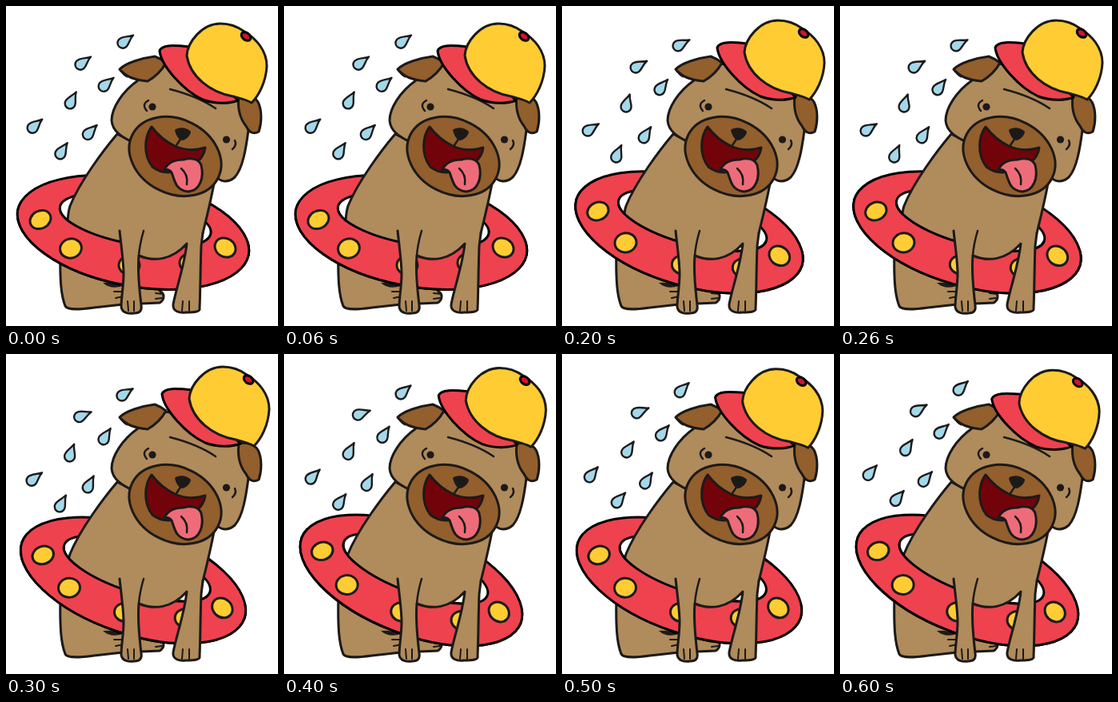
An HTML page that plays this animation: 340 px wide and 400 px high, repeating every 0.7 s.

```html
<!DOCTYPE html>
<html lang="en">
<meta charset="utf-8">
<title>Pug with a swim ring</title>
<style>
html, body { margin: 0; width: 100%; height: 100%; overflow: hidden; background: #fff }
svg { display: block; width: 340px; height: 400px; stroke: #1c1a19; stroke-width: 3; stroke-linecap: round; stroke-linejoin: round }
.fur { fill: #b08b5b }
.dark { fill: #925f2d }
.red { fill: #ee424f }
.sun { fill: #fc3 }
.ink { fill: #1c1a19; stroke: none }
.line { fill: none; stroke-width: 2.5 }
.thin { fill: none; stroke-width: 2 }
#ring, #brim, #button { stroke: #000 }
</style>
<svg viewBox="0 0 340 400">
  <defs>
    <g id="ring">
      <path class="red" fill-rule="evenodd" d="M14.700 255a147 67.500 11 0 1 288.600 56a147 67.500 11 0 1-288.600-56zM67.500 251a95.500 30 10 0 1 188.500 33.500a95.500 30 10 0 1-188.500-33.500z"/>
      <g class="sun" stroke="#1c1a19">
        <ellipse rx="13.5" ry="11" transform="translate(43 267) rotate(-28)"/>
        <ellipse rx="13.5" ry="12" transform="translate(81 303) rotate(-15)"/>
        <ellipse cx="154" cy="324" rx="13" ry="11.5"/>
        <ellipse cx="230" cy="321" rx="13" ry="11.5"/>
        <ellipse rx="13.5" ry="11.5" transform="translate(274 302) rotate(32)"/>
      </g>
    </g>
    <clipPath id="front"><path d="M-20 236L360 303V420H-20z"/></clipPath>
    <path id="drop" fill="#a3d8ea" stroke-width="2.4" d="M3-13C0-7-6.500-3-6.500 3A6.500 6.500 0 0 0 6.500 3C6.500-2 3-6 3-13z"/>
  </defs>

  <g id="drops"></g>

  <g id="hind">
    <path class="fur" d="M68 300C67 345 69 362 74 375C77 381 95 379 110 377L146 373L192 371C199 367 198 359 193 357L185 345V300z"/>
    <path class="ink" d="M121 346Q134 345 146 350Q131 355 121 346z"/>
    <path class="thin" d="M135 357H147M137 365L147 363M187 359L196 360M187 366L195 365"/>
  </g>

  <g class="spin"><use href="#ring"/></g>
  <path class="fur" d="M139 160C122 180 92 220 80 250Q76 262 76 300H240L245 288C250 268 255 248 260 222z"/>
  <g class="spin"><use href="#ring" clip-path="url(#front)"/></g>

  <g id="legs">
    <path class="fur" d="M142 281C144 300 147 320 147 335C147 350 144 365 144 376C145 384 154 385 160 384C168 384 170 380 169 374C167 355 164 335 166 312C185 320 207 318 226 297C223 325 212 355 209 373C208 382 217 384 225 383C236 383 243 382 242 378C243 355 243 325 244 300L246 284"/>
    <path class="line" d="M172 281Q167 298 166 312"/>
    <path class="thin" d="M152 369L153 381M160 369V381M221 369L220 381M229 369V381"/>
  </g>

  <g id="head">
    <path class="fur" d="M165 93C145 107 132 128 132 143C133 157 145 164 160 171L262 212C268 221 278 221 286 214C296 203 300 178 303 155L291 110L250 80L198 72z"/>
    <path class="dark" d="M142 79C150 71 170 65 186 63Q194 66 200 71C194 82 184 90 177 94C166 93 150 90 142 79z"/>
    <path class="ink" d="M142 79Q150 82 152 90Q145 87 142 79z"/>
    <path class="dark" d="M291 112C289 128 292 140 300 150C304 158 309 161 316 157C320 145 320 130 315 120C310 112 300 110 291 112z"/>
    <ellipse class="dark" rx="60" ry="46.500" transform="translate(211.500 188) rotate(27)"/>
    <path fill="#73030a" d="M182 151C173 163 171 186 183 201C193 209 205 209 215 206C236 201 247 191 249 177C236 181 222 180 211 175Q194 167 182 151z"/>
    <path fill="#ee6c79" d="M198 205C202 195 211 192 222 192C231 189 241 191 244 199C248 215 242 231 228 232C212 231 211 218 207 208Q203 203 198 205z"/>
    <path class="line" d="M219 203Q228 211 226 223M219 165L213 174M178 118Q169 123 176 131M286 168Q289 174 283 179M205 104Q240 113 262 128"/>
    <path class="ink" d="M211 155C215 151 226 151 231 157C231 162 224 168 220 168C215 167 212 160 211 155z"/>
    <circle class="ink" cx="183" cy="126" r="4.6"/>
    <circle class="ink" cx="275.5" cy="167" r="4.6"/>
  </g>

  <g id="cap">
    <path id="brim" class="red" d="M229 51C210 49 195 48 192 56C194 75 222 106 246 117C262 123 280 122 290 118L240 70z"/>
    <path class="sun" d="M226 62C227 45 245 22 268 22C280 22 290 26 298 32C313 41 326 56 326 75C325 95 316 112 307 121C300 117 295 116 284 113C255 108 230 88 226 62z"/>
    <ellipse id="button" fill="#cf1530" rx="6.5" ry="4.5" transform="translate(300 38) rotate(38)"/>
  </g>
</svg>
<script>
const STEP = 100, STEPS = 7, PEAK = 3;
const SLIP = 5; // step at which the ring drops back two notches

// Centre, mean tilt and wobble phase
const drops = [
  [148, 44, 43, 0], [95, 71, 51, -2], [124, 98, 30, 1.6], [81, 119, 15, 2.9],
  [35, 150, 38, 0], [104, 158, 25, 1.6], [69, 182, 22, 3.1]
].map(([x, y, tilt, phase]) => ({ x, y, tilt, phase }));

const place = (el, x, y, turn, pivot = '') =>
  el.setAttribute('transform', `translate(${x} ${y}) rotate(${turn} ${pivot})`);
const spins = document.querySelectorAll('.spin');
const cap = document.getElementById('cap');
const layer = document.getElementById('drops');
for (const d of drops) {
  d.el = document.createElementNS('http://www.w3.org/2000/svg', 'use');
  d.el.setAttribute('href', '#drop');
  layer.append(d.el);
}

function draw() {
  const i = Math.floor(performance.now() / STEP) % STEPS;
  const out = Math.min(i, PEAK), back = i - out;
  const notch = i < SLIP ? i : i - 2;

  spins.forEach(el => place(el, 0, 0, 2.6 * notch, '159 283'));
  place(cap, out - 1.6 * back, 1.5 * back - 2 * out, -0.5 * back, '260 75');
  for (const d of drops) {
    const wobble = 9 * Math.sin(2 * Math.PI * i / STEPS + d.phase);
    place(d.el, d.x - 0.3 * out + 0.9 * back, d.y + 2 * out - 2.4 * back, d.tilt + wobble);
  }
  requestAnimationFrame(draw);
}
draw();
</script>
</html>
```
